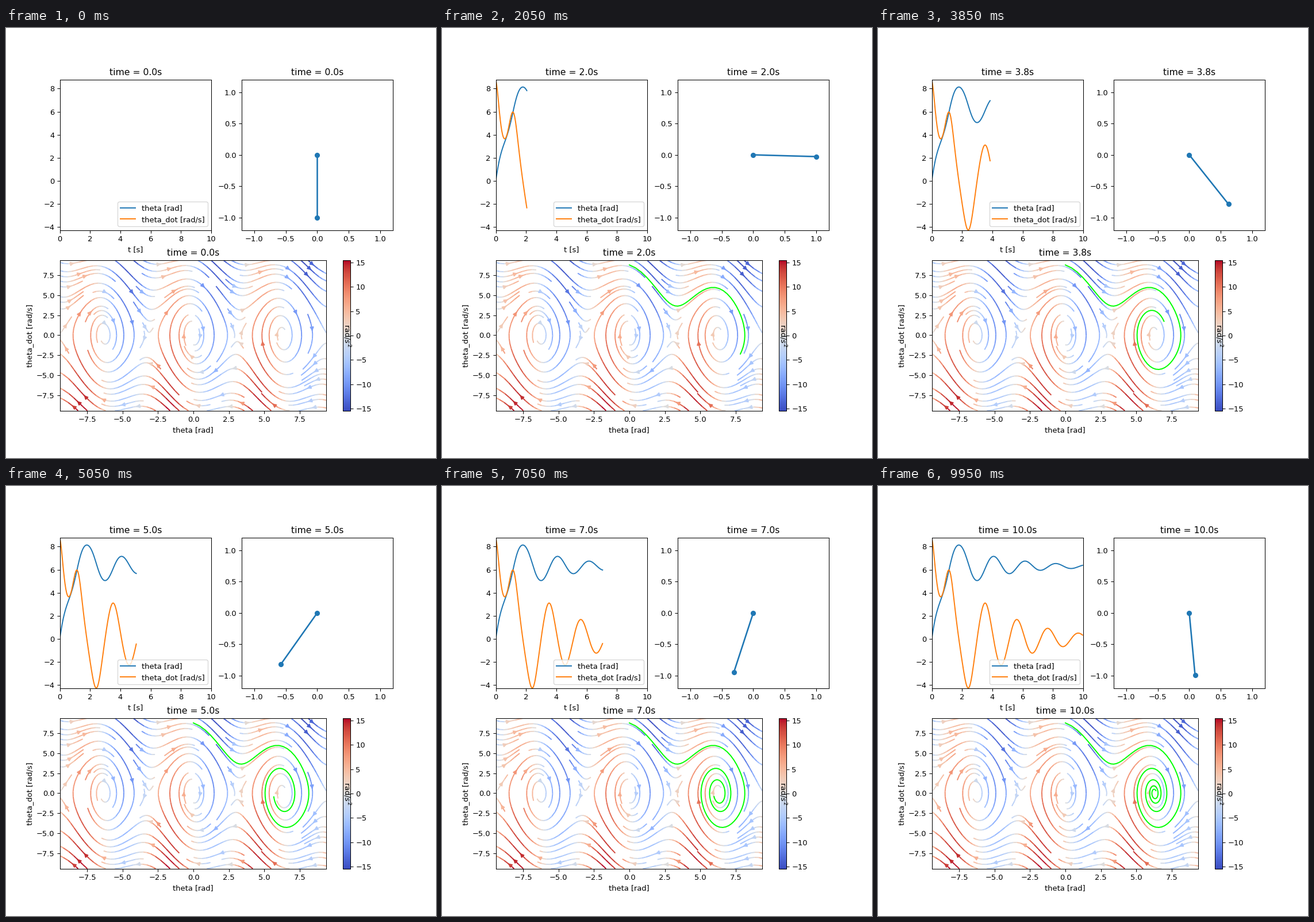
These frames come from a looping animation (748 by 748 pixels, 10 s). A matplotlib script:

```python
import numpy as np
import matplotlib.pyplot as plt
from matplotlib.animation import FuncAnimation

GRAVITY, DAMPING = 9.81, 0.6
START = (0.0, 8.78)
FRAMES, DT, SUBSTEPS = 200, 0.05, 20
LIMIT = 3 * np.pi


def acceleration(theta, omega):
    return -GRAVITY * np.sin(theta) - DAMPING * omega


def slope(state):
    return np.array([state[1], acceleration(*state)])


def rk4(state, h):
    k1 = slope(state)
    k2 = slope(state + h / 2 * k1)
    k3 = slope(state + h / 2 * k2)
    k4 = slope(state + h * k3)
    return state + h / 6 * (k1 + 2 * k2 + 2 * k3 + k4)


def simulate():
    states = [np.array(START)]
    for _ in range(FRAMES - 1):
        state = states[-1]
        for _ in range(SUBSTEPS):
            state = rk4(state, DT / SUBSTEPS)
        states.append(state)
    return np.array(states).T


time = np.arange(FRAMES) * DT
theta, omega = simulate()

fig = plt.figure(figsize=(8, 8), dpi=93.5)
series_ax = fig.add_subplot(2, 2, 1)
swing_ax = fig.add_subplot(2, 2, 2)
phase_ax = fig.add_subplot(2, 1, 2)

# Angle and angular speed over time
theta_line, = series_ax.plot([], [], label="theta [rad]")
omega_line, = series_ax.plot([], [], label="theta_dot [rad/s]")
series_ax.set(xlim=(0, 10), ylim=(omega.min(), omega.max()), xlabel="t [s]")
series_ax.legend(loc="lower right")

# Pendulum
rod, = swing_ax.plot([], [], "o-", lw=2)
swing_ax.set(xlim=(-1.2, 1.2), ylim=(-1.2, 1.2))

# Phase portrait; the grid stops just short of the upper limit
axis = np.arange(-LIMIT, LIMIT, 0.1)
grid_theta, grid_omega = np.meshgrid(axis, axis)
grid_acc = acceleration(grid_theta, grid_omega)
stream = phase_ax.streamplot(axis, axis, grid_omega, grid_acc,
                             color=grid_acc, cmap="coolwarm")
path, = phase_ax.plot([], [], color="lime")
phase_ax.set(xlim=(axis[0], axis[-1]), ylim=(axis[0], axis[-1]),
             xlabel="theta [rad]", ylabel="theta_dot [rad/s]")
bar = fig.colorbar(stream.lines, ax=phase_ax)
bar.ax.text(0.5, 0.5, "rad/$s^2$", rotation=270, ha="center", va="center",
            transform=bar.ax.transAxes)

titles = [ax.set_title("") for ax in (series_ax, swing_ax, phase_ax)]


def update(i):
    shown = slice(0, i + 1)
    theta_line.set_data(time[shown], theta[shown])
    omega_line.set_data(time[shown], omega[shown])
    path.set_data(theta[shown], omega[shown])
    rod.set_data([0, np.sin(theta[i])], [0, -np.cos(theta[i])])
    # Halves round to the even tenth
    for title in titles:
        title.set_text(f"time = {np.round(i / 2) / 10:.1f}s")
    return [theta_line, omega_line, path, rod, *titles]


anim = FuncAnimation(fig, update, frames=FRAMES, interval=50, repeat=True)
plt.show()
```
